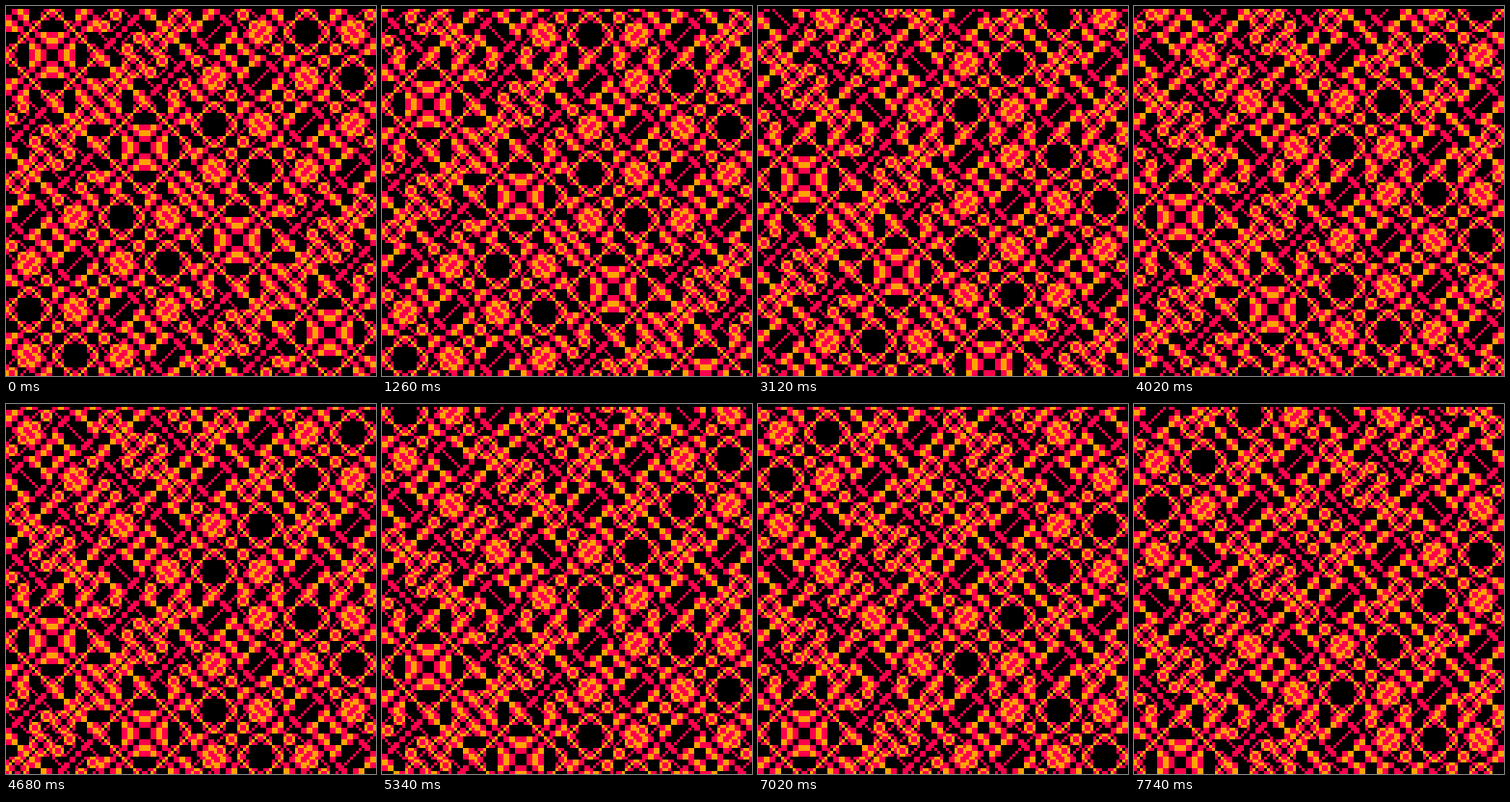
Write an HTML page with a canvas that moves like this. It is 384 by 384 pixels and loops after 7800 ms.

```html
<!DOCTYPE html>
<html>
<head>
<meta charset="utf-8">
<style>
  html, body { margin: 0; width: 100%; height: 100%; overflow: hidden; background: #000; }
  canvas { display: block; width: 384px; height: 384px; image-rendering: pixelated; }
</style>
</head>
<body>
<canvas id="stage" width="128" height="128"></canvas>
<script>
const SIZE = 128, LOOP = 7800, TICK = 60;
const ctx = document.getElementById('stage').getContext('2d');
const image = ctx.createImageData(SIZE, SIZE);
const pixels = new Uint32Array(image.data.buffer);

// Colours as 0xAABBGGRR
const BLACK = 0xff000000, RED = 0xff4d00ff, ORANGE = 0xff00a3ff;
const palette = [BLACK, BLACK, RED, RED, ORANGE, ORANGE, RED, RED, BLACK, BLACK, BLACK];
const mod = (a, n) => ((a % n) + n) % n;

function draw(shift) {
  pixels.fill(BLACK);
  // The top row stays black
  for (let y = 1; y < SIZE; y++) {
    const v = y - 1 - shift;
    for (let x = 0; x < SIZE; x++) {
      pixels[y * SIZE + x] = palette[mod(x ^ v, palette.length)];
    }
  }
  ctx.putImageData(image, 0, 0);
}

let last = -1;
function frame() {
  const tick = Math.floor((performance.now() % LOOP) / TICK);
  // Five one-cell steps in every six ticks
  const shift = tick - Math.floor((tick + 4) / 6);
  if (shift !== last) draw(last = shift);
  requestAnimationFrame(frame);
}
frame();
</script>
</body>
</html>
```
